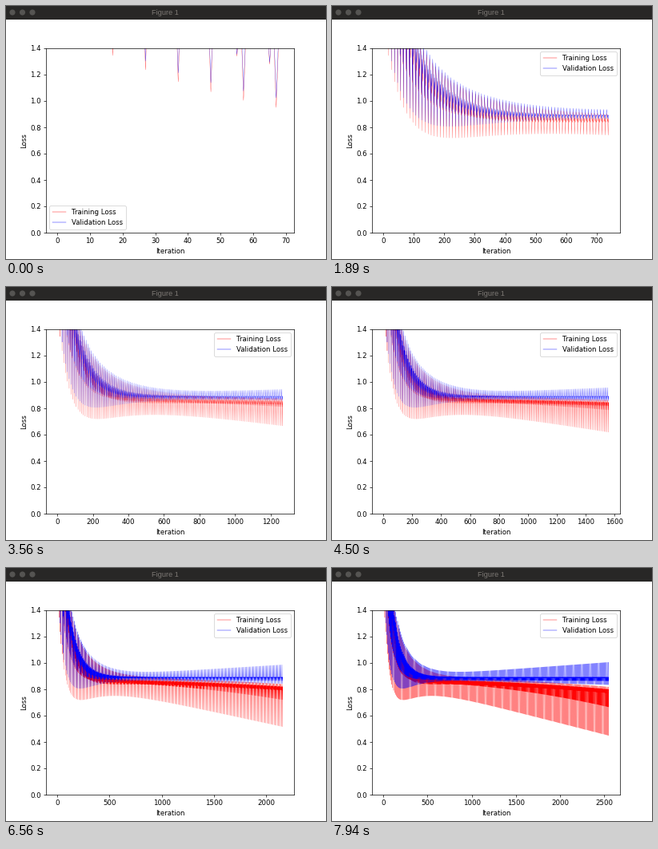
A matplotlib script that plays this animation: 400x317 px, repeating every 8 s.

```python
import numpy as np
import matplotlib.pyplot as plt
from matplotlib.animation import FuncAnimation
from matplotlib.patches import Circle, Rectangle

W, H, DPI = 400, 317, 62.5
FRAMES, LOOP = 144, 8000
BATCHES = 10

# epochs finished by a given frame; redraws slow down as the data grows
KEY_FRAMES = [0, 21, 46, 81, 97, 118, 142]
KEY_EPOCHS = [7, 51, 96, 156, 182, 216, 255]

# keep every thin spike instead of merging neighbours into solid bars
plt.rcParams["path.simplify"] = False


def decay(t, amp, tau):
    return amp * np.exp(-t / tau)


def make_losses(count):
    """Per-batch losses: every batch of the epoch follows its own smooth curve."""
    t = np.arange(count, dtype=float)
    k = np.arange(count) % BATCHES
    s = t / 1000
    offset = np.array([-.4, .5, 0, .9, .2, 0, .6, 0, .3, -1])[k]
    spread = decay(t, .15, 200)
    high = decay(t, .8, 195) + decay(t, 1.2, 60)
    dip = decay(t, 1.1, 64)
    second = decay(t, 1.0, 75)

    train = .865 - .0115 * s**2 + decay(t, 1.46, 96) + offset * (.018 + spread)
    val = .891 + decay(t, 1.5, 97) + offset * (.003 + spread)

    def put(batch, train_curve, val_curve):
        pick = k == batch
        train[pick] = train_curve[pick]
        val[pick] = val_curve[pick]

    put(2, .893 - .0115 * s**2 + .92 * high, .881 + .049 * s + high)
    put(5, .86 - .03 * s**2 + second, .874 - .004 * s + second)
    put(7, .887 - .172 * s + dip - decay(t, .41, 242),
        .885 - .02 * s + dip - decay(t, .35, 190))
    return t, train, val


steps, train_loss, val_loss = make_losses(BATCHES * KEY_EPOCHS[-1])

fig = plt.figure(figsize=(W / DPI, H / DPI), dpi=DPI, facecolor="white")
ax = fig.add_axes([50 / W, 33 / H, 310 / W, 231 / H])
train_line, = ax.plot([], [], "r-", lw=.28, label="Training Loss")
val_line, = ax.plot([], [], "b-", lw=.28, label="Validation Loss")
ax.set_ylim(0, 1.4)
ax.set_xlabel("Iteration")
ax.set_ylabel("Loss")
for handle in ax.legend(loc="best").get_lines():
    handle.set_linewidth(.5)

# window title bar, in pixels from the lower left
bar = dict(transform=None)
fig.add_artist(Rectangle((0, H - 17), W, 17, color="#282726", lw=0, **bar))
for x in (8, 20.5, 33):
    fig.add_artist(Circle((x, H - 8), 3.6, color="#555452", lw=0, **bar))
fig.text(199 / W, (H - 8.5) / H, "Figure 1", family="Liberation Sans", size=10.5,
         color="#7c7874", ha="center", va="center")


def draw(i):
    n = BATCHES * int(round(np.interp(i, KEY_FRAMES, KEY_EPOCHS)))
    train_line.set_data(steps[:n], train_loss[:n])
    val_line.set_data(steps[:n], val_loss[:n])
    last = n - 1
    ax.set_xlim(-.05 * last, 1.05 * last)
    return train_line, val_line


anim = FuncAnimation(fig, draw, frames=FRAMES, interval=LOOP / FRAMES,
                     repeat=True, repeat_delay=0, blit=False)
plt.show()
```
